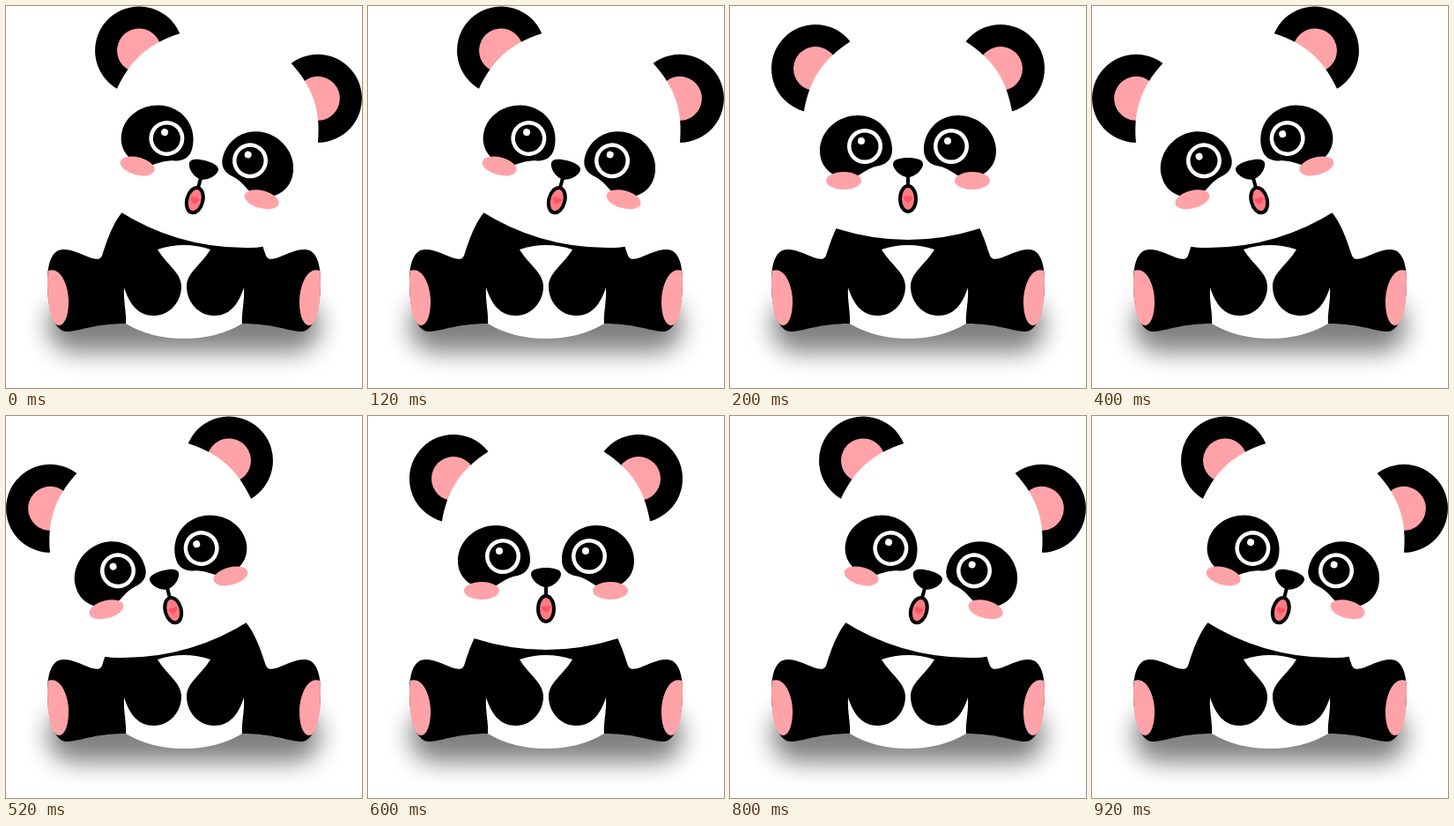
An HTML page for the animation above (1 s loop, 404 by 433 pixels).

```html
<!DOCTYPE html>
<html lang="en">
<head>
<meta charset="utf-8">
<title>Panda</title>
<style>
  html, body { margin: 0; width: 100%; height: 100%; overflow: hidden; background: #fff; }
  svg { display: block; width: 100%; height: 100%; }
  .pink { fill: #ffa3a8; }
  .white { fill: #fff; }
</style>
</head>
<body>
<svg viewBox="0 0 404 433">
  <defs>
    <filter id="blur" x="-30%" y="-100%" width="160%" height="300%">
      <feGaussianBlur stdDeviation="14"/>
    </filter>
    <g id="ear">
      <circle cx="97" cy="71" r="50"/>
      <circle class="pink" cx="97" cy="71" r="25"/>
    </g>
    <g id="patch">
      <path d="M102 164C102 142 122 124 145 124C168 124 184 142 184 163C184 174 177 180 167 181.5C156 184 150 190 142 194C125 199 102 188 102 164Z"/>
      <ellipse class="pink" cx="129" cy="198" rx="20" ry="10"/>
    </g>
    <g id="eye">
      <circle class="white" r="20"/>
      <circle r="15.5"/>
      <circle class="white" cx="-4" cy="-6" r="4"/>
    </g>
    <path id="pad" class="pink" d="M48 300C62 295 71 317 71 335C71 352 66 362 60 362C53 362 47 345 47 312Q47 304 48 300Z"/>
    <path id="side" d="M203 225H140C125 239 118 255 109 283C107 288 102 287 98 286C90 284 78 276 65 276C52 276 47 292 47 312C47 345 55 369 69 369C82 369 100 360 136 360H203Z"/>
  </defs>

  <rect x="48" y="332" width="308" height="60" rx="28" opacity=".5" filter="url(#blur)"/>

  <use href="#side"/>
  <use href="#side" transform="matrix(-1 0 0 1 404 0)"/>
  <path class="white" d="M172 276Q202 266 232 276C222 293 205 302 205 318C205 336 219 351 236 351C254 351 264 338 270 319C271 335 267 348 268 360Q240 377 202 377Q164 377 136 360C137 348 133 335 134 319C140 338 150 351 168 351C185 351 199 336 199 318C199 302 182 293 172 276Z"/>
  <use href="#pad"/>
  <use href="#pad" transform="matrix(-1 0 0 1 404 0)"/>

  <g id="head">
    <use href="#ear"/>
    <use href="#ear" x="210"/>
    <path class="white" d="M84 119C90 85 104 61 137 40C175 18 229 18 267 40C300 61 314 85 320 119C340 190 320 240 284 252Q202 278 120 252C84 240 64 190 84 119Z"/>
    <use href="#patch"/>
    <use href="#patch" transform="matrix(-1 0 0 1 404 0)"/>
    <use href="#eye" x="153" y="159"/>
    <use href="#eye" x="251" y="159"/>
    <path d="M185 179C185 174 193 172 202 172C211 172 219 174 219 179C219 186 209 194 202 194C195 194 185 186 185 179Z"/>
    <path d="M202 192V204" stroke="#000" stroke-width="4"/>
    <ellipse cx="202" cy="218.5" rx="9" ry="14.5" fill="#ff7c85" stroke="#000" stroke-width="4"/>
    <path fill="#ff5262" d="M202 223C199 221 197 219 197 217.500C197 215 200.500 214.500 202 217C203.500 214.500 207 215 207 217.500C207 219 205 221 202 223Z"/>
  </g>
</svg>
<script>
  const head = document.getElementById('head');
  const tilts = [15, 0, -15, 0, 15];
  const step = 200;
  const start = performance.now();

  function draw() {
    const i = Math.floor((performance.now() - start) / step) % tilts.length;
    head.setAttribute('transform', `rotate(${tilts[i]} 202 266)`);
    requestAnimationFrame(draw);
  }
  draw();
</script>
</body>
</html>
```
